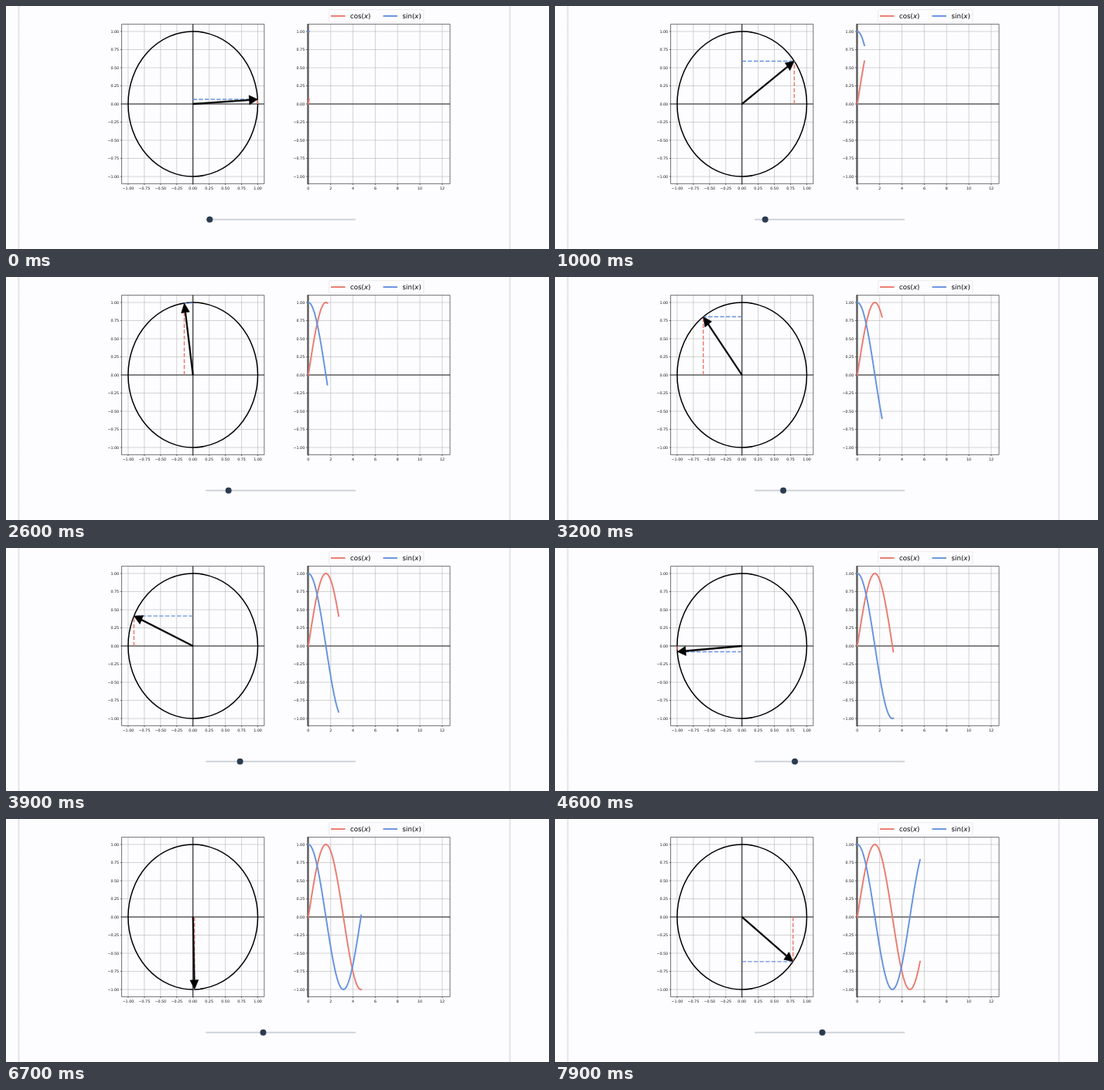
An HTML page that plays this animation: 702x315 px, repeating every 8000 ms.

```html
<!DOCTYPE html>
<html lang="en">
<head>
<meta charset="utf-8">
<title>Unit circle</title>
<style>
  html, body { margin: 0; width: 100%; height: 100%; overflow: hidden; background: #fdfcfe; }
  svg { display: block; width: 702px; height: 315px; }
  text { font-family: "DejaVu Sans", sans-serif; font-size: 4.8px; fill: #111; text-rendering: geometricPrecision; }
  .legend { font-size: 8.64px; fill: #000; }
  path, ellipse { fill: none; }
  .grid { stroke: #b0b0b0; stroke-width: .55; }
  .axis { stroke: #222; stroke-width: 1.1; }
  .frame { stroke: #000; stroke-width: .55; }
  .red { stroke: #ea7b6e; }
  .blue { stroke: #6592e0; }
  .curve { stroke-width: 1.9; stroke-linecap: square; stroke-linejoin: round; }
  .dash { stroke-width: 1.44; stroke-dasharray: 5.33 2.3; }
  #arrow { fill: #000; stroke: #000; stroke-width: .5; }
</style>
</head>
<body>
<svg viewBox="0 0 702 315">
  <defs>
    <linearGradient id="edge">
      <stop offset="0" stop-color="#e4e3e9" stop-opacity="0"/>
      <stop offset=".5" stop-color="#e4e3e9"/>
      <stop offset="1" stop-color="#e4e3e9" stop-opacity="0"/>
    </linearGradient>
  </defs>
  <rect x="14.5" width="4" height="315" fill="url(#edge)"/>
  <rect x="649.5" width="4" height="315" fill="url(#edge)"/>

  <g id="plots"></g>
  <ellipse cx="241.7" cy="127" rx="83.8" ry="94" stroke="#000" stroke-width="1.5"/>
  <path id="drop" class="red dash"/>
  <path id="side" class="blue dash"/>
  <path id="arrow"/>
  <path id="sine" class="red curve"/>
  <path id="cosine" class="blue curve"/>

  <rect x="417.7" y="4.7" width="122.3" height="16.4" rx="1.7" fill="#fdfcfe" stroke="#dcdcde" stroke-width=".6"/>
  <path class="red curve" d="M421 13H437.6"/>
  <path class="blue curve" d="M488.5 13H505"/>
  <text class="legend" x="445" y="16">cos(<tspan font-style="italic">x</tspan>)</text>
  <text class="legend" x="512.6" y="16">sin(<tspan font-style="italic">x</tspan>)</text>

  <path d="M259 276.7H451.3" stroke="#ced4da" stroke-width="2" stroke-linecap="round"/>
  <circle id="knob" cy="276.7" r="4" fill="#2b3b50"/>
</svg>
<script>
const STEP = 4 * Math.PI / 199, FRAME = 100, LOOP = 8000;
// [frame, slider step]: playback speeds up slightly after the start
const PACE = [[0, 1], [19, 19], [27, 29], [32, 35], [63, 71], [79, 89]];

const left = { x0: 241.7, xu: 83.8, min: -1.1, max: 1.1 };
const right = { x0: 390.9, xu: 14.42, min: -.09, max: 12.7 };
const yPos = v => 127 - 94 * v;
const xPos = (plot, v) => plot.x0 + plot.xu * v;
const point = (plot, x, y) => xPos(plot, x).toFixed(2) + ' ' + yPos(y).toFixed(2);
const byId = id => document.getElementById(id);
const setPath = (id, d) => byId(id).setAttribute('d', d);

const quarters = Array.from({ length: 9 }, (_, i) => i / 4 - 1);
const label = (v, digits) => (v < 0 ? '\u2212' : '') + Math.abs(v).toFixed(digits);

function plotMarkup(plot, xTicks, digits) {
  const x1 = xPos(plot, plot.min), x2 = xPos(plot, plot.max);
  const top = yPos(1.1), bottom = yPos(-1.1);
  let grid = '', ticks = '', texts = '';
  for (const v of xTicks) {
    const x = xPos(plot, v);
    grid += `M${x} ${top}V${bottom}`;
    ticks += `M${x} ${bottom}v1.7`;
    texts += `<text x="${x}" y="237.6" text-anchor="middle">${label(v, digits)}</text>`;
  }
  for (const v of quarters) {
    const y = yPos(v);
    grid += `M${x1} ${y}H${x2}`;
    ticks += `M${x1} ${y}h-1.7`;
    texts += `<text x="${x1 - 3.4}" y="${y + 1.75}" text-anchor="end">${label(v, 2)}</text>`;
  }
  return `<path class="grid" d="${grid}"/>
    <path class="axis" d="M${x1} 127H${x2}M${plot.x0} ${top}V${bottom}"/>
    <path class="frame" d="${ticks}M${x1} ${top}H${x2}V${bottom}H${x1}Z"/>${texts}`;
}

function stepAt(frame) {
  const i = Math.max(1, PACE.findIndex(p => p[0] >= frame));
  const [f0, k0] = PACE[i - 1], [f1, k1] = PACE[i];
  return Math.floor(k0 + (k1 - k0) * (frame - f0) / (f1 - f0) + 1e-6);
}

function curve(fn, steps) {
  const pts = Array.from({ length: steps + 1 }, (_, i) => point(right, i * STEP, fn(i * STEP)));
  return 'M' + pts.join('L');
}

function arrow(c, s) {
  // [distance along, offset across] in plot units
  const outline = [[0, .01], [.87, .01], [.87, .065], [1, 0], [.87, -.065], [.87, -.01], [0, -.01]];
  return 'M' + outline.map(([a, b]) => point(left, a * c - b * s, a * s + b * c)).join('L') + 'Z';
}

function draw(now) {
  const steps = stepAt(Math.floor(now % LOOP / FRAME));
  const angle = steps * STEP, c = Math.cos(angle), s = Math.sin(angle);
  setPath('drop', `M${point(left, c, 0)}L${point(left, c, s)}`);
  setPath('side', `M${point(left, 0, s)}L${point(left, c, s)}`);
  setPath('arrow', arrow(c, s));
  setPath('sine', curve(Math.sin, steps));
  setPath('cosine', curve(Math.cos, steps));
  byId('knob').setAttribute('cx', 262.4 + 14.8 * angle);
}

byId('plots').innerHTML = plotMarkup(left, quarters, 2) + plotMarkup(right, [0, 2, 4, 6, 8, 10, 12], 0);
const start = performance.now();
function tick() {
  draw(performance.now() - start);
  requestAnimationFrame(tick);
}
tick();
</script>
</body>
</html>
```
